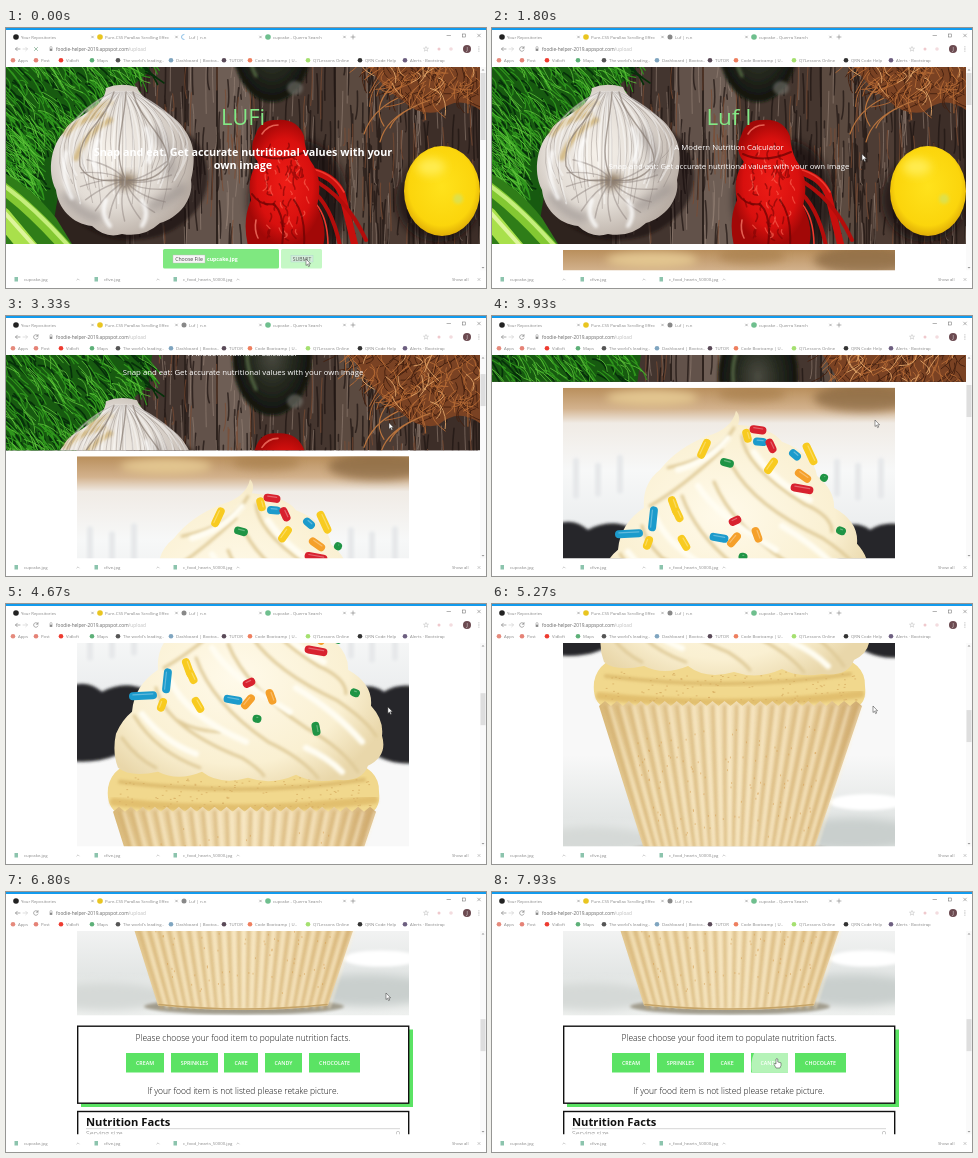
Write an HTML page that moves like this. It is 480 px wide and 260 px high and loops after 8000 ms.

```html
<!DOCTYPE html>
<html lang="en">
<head>
<meta charset="utf-8">
<title>Food nutrition page</title>
<style>
html, body { margin: 0; width: 100%; height: 100%; overflow: hidden; background: #fff; }
svg { display: block; width: 480px; height: 260px; font-family: "Open Sans", "Noto Sans", sans-serif; }
.mid { text-anchor: middle; }
.ui { font-size: 4.3px; fill: #888; }
.light { font-weight: 300; }
</style>
</head>
<body>
<svg id="stage" viewBox="0 0 480 260"></svg>
<script>
const LOOP = 8000, LOADED = 1270, HOVER = 7720;
const GREEN = '#5be364';

let seed = 7;
const rand = (a = 0, b = 1) => {
  seed = (seed * 16807) % 2147483647;
  return a + (b - a) * seed / 2147483647;
};

const rect = (x, y, w, h, fill, extra = '') =>
  `<rect x="${x}" y="${y}" width="${w}" height="${h}" fill="${fill}" ${extra}/>`;
const oval = (x, y, rx, ry, fill, extra = '') =>
  `<ellipse cx="${x}" cy="${y}" rx="${rx}" ry="${ry}" fill="${fill}" ${extra}/>`;
const shape = (d, fill, extra = '') => `<path d="${d}" fill="${fill}" ${extra}/>`;
const line = (d, color, width = 1, extra = '') =>
  `<path d="${d}" fill="none" stroke="${color}" stroke-width="${width}" stroke-linecap="round" ${extra}/>`;
const text = (x, y, size, fill, str, extra = '') =>
  `<text x="${x}" y="${y}" font-size="${size}" fill="${fill}" ${extra}>${str}</text>`;
const ui = (x, y, str) => `<text class="ui" x="${x}" y="${y}">${str}</text>`;
const repeat = (n, make) => Array.from({ length: n }, (_, i) => make(i)).join('');
const SOFT = 'filter="url(#soft)"', BLUR = 'filter="url(#blur)"';

function gradient(id, stops, kind = 'radial', attrs = '') {
  const list = stops.map(([at, color]) => `<stop offset="${at}" stop-color="${color}"/>`).join('');
  return `<${kind}Gradient id="${id}" ${attrs}>${list}</${kind}Gradient>`;
}

const defs = `<defs>
  <filter id="soft" x="-30%" y="-30%" width="160%" height="160%"><feGaussianBlur stdDeviation="1.6"/></filter>
  <filter id="blur" x="-50%" y="-50%" width="200%" height="200%"><feGaussianBlur stdDeviation="4"/></filter>
  <clipPath id="page"><rect y="39" width="480" height="203.500"/></clipPath>
  <clipPath id="heroBox"><rect y="30" width="474" height="186"/></clipPath>
  <clipPath id="photo"><rect x="71" y="222" width="332" height="415"/></clipPath>
  ${gradient('garlic', [[0, '#f6f1ea'], [.6, '#e2dcd5'], [1, '#b9aea5']], 'radial', 'cx=".42" cy=".45" r=".6"')}
  ${gradient('lemon', [[0, '#ffe21c'], [.75, '#fbd50c'], [1, '#d9a405']], 'radial', 'cx=".5" cy=".45" r=".58"')}
  ${gradient('lobster', [[0, '#ee1d17'], [.7, '#d8100e'], [1, '#a20807']])}
  ${gradient('avocado', [[0, '#4a4a40'], [.5, '#262a20'], [1, '#10120d']])}
  ${gradient('wall', [[0, '#b98f5c'], [.05, '#d3b28d'], [.085, '#f0ebe5'], [.2, '#f7f8f8'], [.33, '#eceeef'], [.52, '#f8f8f8'], [.75, '#f8f8f8'], [.9, '#e3e6e5'], [1, '#eff1ef']], 'linear', 'x2="0" y2="1"')}
  ${gradient('cream', [[0, '#fffaea'], [.7, '#faf0d2'], [1, '#e9d7aa']], 'radial', 'cx=".45" cy=".5" r=".6"')}
  ${gradient('paper', [[0, '#d9b878'], [.15, '#ead2a0'], [.5, '#f2dfb6'], [.85, '#e8cd9a'], [1, '#cfaa70']], 'linear')}
</defs>`;

/* Hero picture */

function wood() {
  const planks = [[120, 60, '#43352f'], [180, 32, '#62524a'], [212, 34, '#6e5e55'], [246, 84, '#45362f'], [330, 34, '#5b4a40'], [364, 40, '#4d3c34'], [404, 70, '#3d2e28']];
  const grain = (n, color, width) => line(repeat(n, () => {
    const x = rand(125, 474), y = rand(-30, 200);
    return `M${x} ${y}q${rand(-3, 3)} 20 ${rand(-2, 2)} ${rand(15, 60)}`;
  }), color, width, 'opacity=".7"');
  return rect(0, -30, 474, 250, '#2e231e')
    + planks.map(([x, w, c]) => rect(x, -30, w - 2, 250, c)).join('')
    + grain(260, '#1e1512', 1.6) + grain(170, '#9b887b', .8) + grain(110, '#7d4c33', 1.1);
}

function herbs() {
  const needles = (n, color, width) => line(repeat(n, () => {
    const y = rand(-25, 190);
    const edge = y < 45 ? 152 : Math.max(38, 152 - (y - 45) * 1.6);
    const x = rand(-8, edge - 12);
    return `M${x} ${y}q${rand(2, 12)} ${rand(0, 10)} ${rand(6, 20)} ${rand(8, 24)}`;
  }), color, width);
  return shape('M0 -30H152L142 45 96 82 60 120 44 216H0Z', '#175a10')
    + needles(190, '#06300a', 1.7) + needles(300, '#2f961c', 1.1) + needles(170, '#5fc43a', .8)
    + shape('M0 146Q26 160 50 190L66 216H0Z', '#2f7d18')
    + line('M-6 158Q25 180 62 222', '#83c832', 12) + line('M-6 155Q28 178 66 222', '#c5ee7c', 4)
    + line('M-4 188L26 224', '#a9e04b', 18) + line('M-2 184L32 222', '#def59c', 4);
}

function garlic() {
  const veins = (n, color, width) => line(repeat(n, i => {
    const k = (i + rand()) / n;
    return `M${106 + 22 * k} 64Q${30 + 180 * k} ${rand(88, 112)} ${62 + 112 * k} ${rand(130, 182)}`;
  }), color, width, 'opacity=".4"');
  const folds = line(repeat(13, i => {
    const a = -.5 + i * .35;
    return `M120 153q${18 * Math.cos(a + .4)} ${18 * Math.sin(a + .4)} ${46 * Math.cos(a)} ${40 * Math.sin(a)}`;
  }), '#857a76', 1.4, 'opacity=".45"');
  return oval(126, 148, 76, 64, '#120f0a', SOFT + ' opacity=".6"')
    + shape('M100 60Q114 54 131 59C138 78 168 82 180 104C191 120 188 140 185 152C188 172 172 190 154 195Q138 210 116 206Q100 211 86 198C66 196 52 180 50 162C40 142 46 116 58 104C64 88 98 84 100 60Z', 'url(#garlic)')
    + line('M60 106Q70 92 98 86M70 130Q80 104 104 92M84 84L104 74', '#c9a75f', 6, SOFT + ' opacity=".65"')
    + line('M150 104Q166 124 164 146M146 178Q162 172 176 160M60 168Q74 186 92 190', '#8d8583', 9, BLUR + ' opacity=".6"')
    + oval(119, 153, 12, 7, '#7b6549', BLUR + ' opacity=".9"')
    + veins(30, '#8a807c', 1) + veins(22, '#fff', 1.8) + folds
    + line('M108 64C98 98 70 104 74 138Q82 156 118 152M120 64C118 100 106 124 119 150M127 64C134 94 164 110 162 136Q148 156 122 152', '#84786f', 1.4, 'opacity=".65"')
    + line('M92 112Q84 126 90 142M140 100Q148 118 142 134M60 124Q54 148 66 170M100 172Q94 186 104 198M136 172Q144 186 136 198', '#fff', 4, SOFT + ' opacity=".8"');
}

function lobster() {
  const mottle = (n, color, width) => line(repeat(n, () => {
    const a = rand(0, 6.28), r = Math.sqrt(rand());
    return `M${276 + 25 * r * Math.cos(a)} ${160 + 50 * r * Math.sin(a)}q${rand(-3, 3)} 3 ${rand(-4, 4)} ${rand(3, 9)}`;
  }), color, width, 'opacity=".6"');
  return oval(292, 172, 50, 60, '#150b09', BLUR + ' opacity=".7"')
    + line('M300 142Q328 146 336 166L349 218', '#c80f0d', 7) + line('M304 160Q326 178 334 218M304 150Q340 168 360 212', '#b40d0b', 4)
    + line('M300 140Q326 143 338 164M310 176Q322 190 322 218', '#f03a2e', 1.6)
    + shape('M249 108Q254 91 270 92Q291 90 298 108Q299 122 304 132Q318 150 311 178Q322 200 317 218H242Q236 192 245 172Q240 150 252 134Q242 122 249 108Z', 'url(#lobster)')
    + mottle(45, '#7d0404', 1.6) + mottle(26, '#ff6a58', 1.2)
    + line('M251 126Q272 136 299 124M246 166Q254 178 268 176Q280 188 276 218M288 172Q300 188 298 218', '#6d0303', 2, 'opacity=".75"')
    + line('M256 106Q262 97 272 97M250 192Q248 202 252 210', '#ff8573', 1.6, 'opacity=".7"');
}

function coconut() {
  const fibres = (n, color) => line(repeat(n, () => {
    const y = rand(-30, 68), x = rand(330 + Math.max(0, y) * .75, 474);
    return `M${x} ${y}q${rand(-18, 18)} ${rand(3, 12)} ${rand(-20, 12)} ${rand(8, 26)}`;
  }), color, .9);
  return shape('M318 -30H474V82Q452 66 432 84Q412 88 396 72Q366 56 318 -30Z', '#7a4223')
    + fibres(140, '#43200f') + fibres(130, '#b56a35') + fibres(36, '#e0a468')
    + line('M392 70Q366 82 358 106M410 78Q380 90 374 114M384 60Q366 80 378 98M424 72Q390 84 384 100', '#b8733d', 1.2);
}

const heroPicture = wood() + herbs()
  + oval(266, 14, 40, 60, 'url(#avocado)', SOFT) + line('M246 -15Q234 15 250 48', '#566a45', 3, SOFT)
  + oval(289, 60, 8, 7, '#76776f', SOFT + ' opacity=".6"')
  + coconut() + lobster()
  + oval(432, 172, 42, 42, '#17100c', BLUR + ' opacity=".7"')
  + oval(436, 163, 38, 45, 'url(#lemon)') + oval(452, 171, 5, 5, '#dfe04a', SOFT)
  + oval(425, 139, 14, 9, '#ffec50', BLUR) + garlic();

/* Cupcake photo, in page coordinates */

function sprinkle([x, y, angle, length, color]) {
  const r = length / 2 - 4;
  return `<g transform="translate(${x} ${y}) rotate(${angle})">`
    + line(`M${-r} 0H${r}`, color, 8) + line(`M${-r} -1.500H${r}`, '#fff', 1.2, 'opacity=".3"') + '</g>';
}

function cupcake() {
  const blue = '#1c9bcc', red = '#d8222f', yellow = '#f8cb20', orange = '#f5a02b', leaf = '#1f9445';
  const sprinkles = [
    [137, 368, -3, 28, blue], [161, 353, -84, 25, blue], [227, 372, 10, 19, blue], [268, 276, 5, 14, blue], [303, 289, 40, 13, blue],
    [266, 264, 8, 17, red], [279, 280, 65, 15, red], [310, 323, 10, 23, red], [243, 355, -25, 13, red],
    [212, 283, -65, 21, yellow], [182, 340, 70, 20, yellow], [186, 349, 65, 15, yellow], [156, 377, -70, 14, yellow], [192, 377, 60, 17, yellow],
    [255, 270, 75, 14, yellow], [279, 300, -55, 18, yellow], [318, 288, 65, 24, yellow],
    [311, 310, 35, 18, orange], [242, 374, -50, 17, orange], [265, 369, 70, 16, orange],
    [235, 297, 15, 14, leaf], [251, 391, 10, 9, leaf], [310, 401, 80, 14, leaf], [349, 365, 20, 10, leaf], [332, 312, 30, 8, leaf],
  ];
  const folds = 22;
  const ridges = repeat(folds, i => {
    const k = (i + .5) / folds;
    return `M${107 + 263 * k} 484L${152 + 170 * k} 629`;
  });
  const teeth = repeat(folds, i => `L${107 + 263 * (i + .5) / folds} 479L${107 + 263 * (i + 1) / folds} 484`);
  const crumbs = repeat(130, () => `M${rand(110, 366)} ${rand(450, 480)}h1`);
  const speckles = repeat(110, () => `M${rand(145, 325)} ${rand(500, 615)}v1`);
  return rect(71, 222, 332, 415, 'url(#wall)')
    + oval(160, 232, 46, 8, '#e3c690', BLUR) + oval(372, 232, 50, 14, '#84643c', BLUR + ' opacity=".7"')
    + oval(260, 228, 34, 8, '#a47c4a', BLUR + ' opacity=".6"')
    + line('M84 295V330M106 300V328M128 292V325M345 296V328M366 300V332M389 295V330', '#e6e8ea', 6, SOFT)
    + shape('M60 360Q80 350 96 364Q118 352 140 362L128 412Q112 438 60 433Z', '#272829', SOFT)
    + shape('M340 366Q362 352 378 364Q394 354 414 360V434Q380 442 350 412Z', '#272829', SOFT)
    + oval(360, 612, 72, 16, '#c9cfcd', BLUR) + oval(375, 580, 38, 8, '#fff', SOFT)
    + oval(100, 618, 62, 14, '#d5d9d7', BLUR)
    + oval(238, 628, 100, 8, '#a09b8c', SOFT)
    + shape('M102 460Q106 436 140 432H340Q374 440 373 464Q375 480 364 486H113Q100 480 102 460Z', '#f1d88d')
    + line('M108 474Q240 488 368 472', '#dcb562', 8, SOFT + ' opacity=".7"')
    + line(crumbs, '#d9b064', 1, 'opacity=".8"') + line('M114 454Q240 470 358 452', '#d0aa5c', 4, SOFT + ' opacity=".6"')
    + shape(`M107 484${teeth}L322 627Q237 636 152 627Z`, 'url(#paper)')
    + line(ridges, '#cfa968', 3, SOFT + ' opacity=".6"') + line(ridges, '#fff3d6', 2, SOFT + ' opacity=".7" transform="translate(5)"')
    + line(speckles, '#d59a4b', 1, 'opacity=".5"') + line('M153 626Q237 635 321 626', '#c6a468', 1.6)
    + shape('M244 245Q249 250 246 259Q280 262 290 276Q322 288 325 310Q343 325 342 342Q367 356 365 378Q378 392 376 408Q382 428 362 438Q356 455 330 452Q306 456 290 447Q266 458 242 450Q214 458 196 444Q172 454 152 444Q124 450 112 440Q106 424 110 406Q116 392 126 384Q128 358 152 342Q150 318 168 304Q185 282 216 270Q240 263 244 245Z', 'url(#cream)')
    + line('M242 262Q226 292 176 302M250 270Q252 300 312 338Q340 350 340 366M230 284Q190 322 158 340M240 300Q262 340 330 372Q360 392 370 408M222 316Q240 360 300 400Q336 420 352 444M190 330Q206 376 262 414Q296 430 312 450M150 360Q160 400 236 430Q252 440 258 448M128 388Q150 424 194 440M116 410Q130 430 150 440M170 392Q190 404 214 404', '#dfca98', 3, SOFT)
    + line('M236 272Q216 296 186 304M262 286Q282 316 318 334M206 320Q224 350 284 384M164 352Q180 388 240 414M136 386Q158 414 190 426M290 360Q330 384 356 414M300 420Q322 430 336 444', '#fffdf2', 6, SOFT)
    + sprinkles.map(sprinkle).join('');
}

/* Cards below the photo */

const buttons = [[120, 38, 'CREAM'], [165, 47, 'SPRINKLES'], [218, 34, 'CAKE'], [259, 37, 'CANDY'], [303, 51, 'CHOCOLATE']];
const cards = rect(75, 651, 332, 77.5, GREEN)
  + rect(71.7, 647.7, 331, 77, '#fff', 'stroke="#111" stroke-width="1.400"')
  + text(237, 662, 8.45, '#111', 'Please choose your food item to populate nutrition facts.', 'class="mid light"')
  + text(237, 715.5, 8.45, '#111', 'If your food item is not listed please retake picture.', 'class="mid light"')
  + buttons.map(([x, w, label]) => rect(x, 674.5, w, 19.5, GREEN)
    + (label === 'CANDY' ? `<g id="hover">${shape('M262 674.500H296V694H260Q258 684 262 674.500Z', '#b5f3b8')}</g>` : '')
    + text(x + w / 2, 686.3, 5.3, '#fff', label, 'class="mid" font-weight="600"')).join('')
  + rect(71.7, 733, 331, 200, '#fff', 'stroke="#111" stroke-width="1.400"')
  + text(80, 747.5, 11.2, '#111', 'Nutrition Facts', 'font-weight="700"')
  + rect(80, 750, 314, .6, '#bbb')
  + text(80, 757.5, 7, '#777', 'Serving size', 'class="light"') + text(390, 757.5, 7, '#777', '0', 'class="light"');

const TITLE = '#83e886';
const uploadPage = text(237, 97, 22, TITLE, 'LUFi', 'class="mid"')
  + text(237, 128, 10.8, '#fff', 'Snap and eat. Get accurate nutritional values with your', 'class="mid" font-weight="700"')
  + text(237, 141, 10.8, '#fff', 'own image', 'class="mid" font-weight="700"')
  + rect(157, 221, 116, 19.5, '#7fe880', 'rx="1.500"') + rect(167, 227, 32, 8, '#f6f6f6', 'stroke="#bbb" stroke-width=".400"')
  + text(183, 233, 5.2, '#444', 'Choose File', 'class="mid"')
  + text(201, 233, 5.2, '#fff', 'cupcake.jpg', 'font-weight="700"')
  + rect(275, 221, 41, 19.5, '#c5f8c5', 'rx="1.500"') + rect(285, 227.5, 22, 6.5, '#d3ecd9', 'stroke="#a9cfd0" stroke-width=".400"')
  + text(296, 232.7, 5, '#555', 'SUBMIT', 'class="mid"');

const resultText = text(237, 97, 22.5, TITLE, 'Luf I', 'class="mid"')
  + text(237, 122, 7.8, '#fff', 'A Modern Nutrition Calculator', 'class="mid"')
  + text(237, 141, 7.8, '#fff', 'Snap and eat: Get accurate nutritional values with your own image', 'class="mid"');

/* Browser window */

function browser() {
  const tabs = [[10, 'Your Repositories', '#222'], [94, 'Pure-CSS Parallax Scrolling Effec', '#e9c520'], [178, 'Luf | n.n', ''], [262, 'cupcake - Querra Search', '#6fbf8e']];
  const bookmarks = [[12, 'Apps', '#e58a7c'], [35, 'Post', '#e58276'], [60, 'Vidloft', '#ee3b30'], [91, 'Maps', '#5db078'], [117, "The world's leading..", '#555'], [170, 'Dashboard | Bootca..', '#7fa5c0'], [223, 'TUTOR', '#5a4a58'], [249, 'Code Bootcamp | U..', '#ee7f5f'], [307, 'Q7Lessons Online', '#a5e070'], [359, 'QRN Code Help', '#333'], [404, 'Alerts · Bootstrap', '#6d5f80']];
  const files = [[18, 'cupcake.jpg', 72], [98, 'cfive.jpg', 152], [177, 'c_food_hearts_50000.jpg', 232]];
  const cross = (x, y, r) => `M${x - r} ${y - r}l${2 * r} ${2 * r}m0 ${-2 * r}l${-2 * r} ${2 * r}`;
  return rect(0, 0, 480, 39, '#fff') + rect(0, 0, 480, 2, '#129bee')
    + tabs.map(([x, label, color]) => (color ? oval(x, 9, 2.8, 2.8, color) : '') + ui(x + 5, 10.6, label)
      + line(cross(x + 76.5, 9, .9), '#777', .5)).join('')
    + line('M345 9h4m-2 -2v4M441 7.500h3.500' + cross(473, 7.5, 1.4), '#666', .5) + rect(456.5, 6, 3, 3, 'none', 'stroke="#666" stroke-width=".500"')
    + line('M14 21H9.500m1.800 -1.800l-1.800 1.800 1.800 1.800', '#777', .6) + line('M17 21h4.500m-1.800 -1.800l1.800 1.800 -1.800 1.800', '#ccc', .6)
    + `<g id="stop">${line(cross(30, 21, 1.6), '#7ba68a', .7)}</g>`
    + `<g id="reload">${line('M32 20A2.300 2.300 0 1 0 32 22M32 18.500v1.700h-1.700', '#777', .6)}</g>`
    + rect(43.7, 20.7, 2.6, 2.2, '#888') + line('M44 20.500v-1a1 1 0 0 1 2 0v1', '#888', .5)
    + text(50, 22.7, 4.75, '#666', 'foodie-helper-2019.appspot.com<tspan fill="#bbb">/upload</tspan>')
    + shape('M420 18.500l.7 1.700h1.800l-1.400 1.200.5 1.800-1.600-1.100-1.600 1.100.5-1.800-1.400-1.200h1.800Z', 'none', 'stroke="#aaa" stroke-width=".400"')
    + oval(433, 21, 1.5, 1.5, '#efc9cd') + oval(445, 21, 1.8, 1.8, '#f3dcdf')
    + oval(461, 21, 4, 4, '#6b4a50') + text(461, 22.6, 4.5, '#fff', 'J', 'class="mid"')
    + shape('M472.500 18.500h.8v.8h-.8ZM472.500 20.600h.8v.8h-.8ZM472.500 22.700h.8v.8h-.8Z', '#888')
    + bookmarks.map(([x, label, color]) => oval(x - 5, 32.2, 2.3, 2.3, color) + ui(x, 33.8, label)).join('')
    + rect(0, 242.5, 480, 18, '#fff')
    + files.map(([x, label, caret]) => rect(x - 9.5, 249, 3.5, 4.5, '#8cc4ad') + ui(x, 253.2, label)
      + line(`M${caret - 1.2} 252l1.200 -1.200 1.200 1.200`, '#999', .5)).join('')
    + ui(446, 253.2, 'Show all') + line(cross(473, 251.5, 1.1), '#999', .5);
}

const stage = document.getElementById('stage');
stage.innerHTML = defs + rect(0, 0, 480, 260, '#fff')
  + `<g clip-path="url(#page)">
      <g id="content">
        <g clip-path="url(#heroBox)"><g id="hero">${heroPicture}</g></g>
        <g id="upload">${uploadPage}</g>
        <g id="result">${resultText}<g clip-path="url(#photo)">${cupcake()}</g>${cards}</g>
      </g>
      ${rect(474, 39, 6, 204, '#fafafa')}<rect id="thumb" x="474.500" width="5" fill="#dedede"/>
      ${shape('M475.500 42.500l1.500-1.500 1.500 1.500ZM475.500 239l1.500 1.500 1.500-1.500Z', '#999')}
    </g>`
  + browser()
  + `<g id="spinner">${line('M0 -2.500A2.500 2.500 0 0 1 0 2.500', '#6fb0e0', .8)}</g>
     <g id="pageIcon">${oval(178, 9, 2.5, 2.5, '#888')}</g>
     <g id="arrow">${shape('M0 0V6.500L1.500 5.200 2.600 7.600 3.700 7.100 2.600 4.800H4.600Z', '#fff', 'stroke="#333" stroke-width=".500"')}</g>
     <g id="hand">${shape('M-1 -3Q0 -4 .8 -3V0L4 .8V3.500L3 6H-1L-3 2.200Q-3.200 .8 -1 2Z', '#fff', 'stroke="#333" stroke-width=".500"')}</g>`;

const part = Object.fromEntries([...stage.querySelectorAll('g[id], rect[id]')].map(node => [node.id, node]));
const show = (node, on) => node.setAttribute('visibility', on ? 'visible' : 'hidden');
const move = (node, x, y, more = '') => node.setAttribute('transform', `translate(${x} ${y}) ${more}`);

function track(keys, t) {
  const i = keys.findIndex(key => key[0] > t);
  if (i === 0) return keys[0][1];
  if (i < 0) return keys[keys.length - 1][1];
  const [t0, a] = keys[i - 1], [t1, b] = keys[i];
  return a + (b - a) * (t - t0) / (t1 - t0);
}

const scrollKeys = [[2640, 0], [2930, 36], [3930, 150], [4670, 276], [5930, 498], [6060, 513.5]];
const pointerX = [[700, 300], [1600, 370], [1800, 370], [2800, 383], [3930, 383], [5930, 380], [7000, 380], [7760, 285]];
const pointerY = [[700, 231], [1600, 126], [1800, 126], [2800, 109], [3930, 104], [5930, 101], [7000, 101], [7760, 170]];

function draw(now) {
  const t = now % LOOP, loaded = t >= LOADED, hovering = t >= HOVER;
  const scroll = track(scrollKeys, t), x = track(pointerX, t), y = track(pointerY, t);
  move(part.content, 0, -scroll);
  move(part.hero, 0, scroll * 1.31);
  show(part.upload, !loaded);
  show(part.result, loaded);
  show(part.hover, hovering);
  show(part.stop, !loaded);
  show(part.reload, loaded);
  show(part.spinner, !loaded);
  show(part.pageIcon, loaded);
  move(part.spinner, 178, 9, `rotate(${180 - t * .36})`);
  part.thumb.setAttribute('y', 45 + scroll * .16);
  part.thumb.setAttribute('height', loaded ? 32 : 67);
  show(part.arrow, !hovering);
  show(part.hand, hovering);
  move(part.arrow, x, y);
  move(part.hand, x, y);
  requestAnimationFrame(() => draw(performance.now()));
}
draw(performance.now());
</script>
</body>
</html>
```
